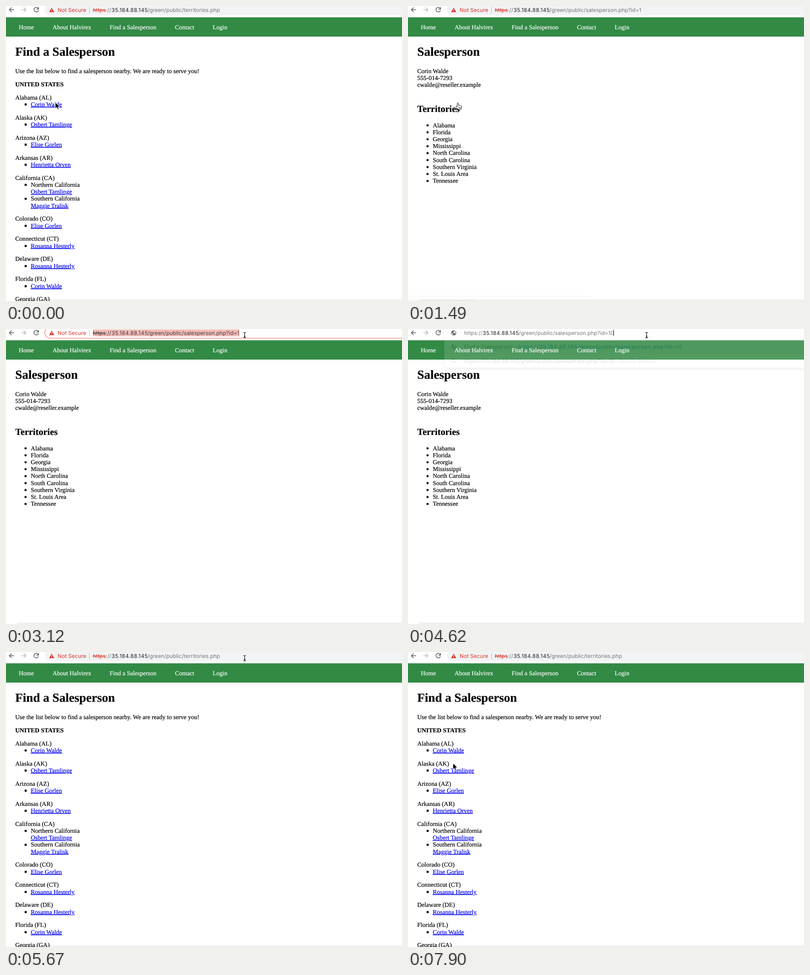
An HTML page that plays this animation: 867x646 px, repeating every 8000 ms.

```html
<!DOCTYPE html>
<html lang="en">
<head>
<meta charset="utf-8">
<title>Find a Salesperson</title>
<style>
html, body { margin: 0; width: 100%; height: 100%; overflow: hidden; background: #fff; }
svg { display: block; width: 867px; height: 646px; }
text {
  font: 13.55px "Liberation Serif", "Times New Roman", serif;
  text-rendering: geometricPrecision; white-space: pre;
  fill: currentColor; stroke: currentColor; stroke-width: .2px;
}
tspan { fill: currentColor; }
.h1 { font-size: 27.1px; font-weight: bold; }
.h2 { font-size: 20.32px; font-weight: bold; }
.b { font-weight: bold; }
.link { color: #00e; text-decoration: underline; }
.nav text { color: #fff; }
.ui text { font: 11.75px Inter, "Open Sans", sans-serif; letter-spacing: .05px; stroke: none; }
.ui .match { font-weight: 700; letter-spacing: .35px; color: #1a6fdf; }
.host { letter-spacing: .38px; }
.grey { color: #73777b; }
.ink { color: #202124; }
.red { color: #d5352b; }
.cut { text-decoration: line-through; }
.picked tspan { color: #4a3a3b; }
#bubble text { font-size: 10.2px; color: #555; }
</style>
</head>
<body>
<svg viewBox="0 0 867 646">
  <defs>
    <g id="globe">
      <circle r="5.6" fill="#5f6368"/>
      <path d="M-4.6-.8L-1 2.6V4.6Q-4.6 3.6-4.6-.8M.3-4.6V-2.6L-1.6-1.4V0H1.6L2.6 1.8H4Q5.6-2.6 2-4.2Z" fill="#fff" opacity=".85"/>
    </g>
    <path id="bar" d="M-3-6Q0-6 0-4V4Q0 6-3 6M3-6Q0-6 0-4M0 4Q0 6 3 6M-1.6 2.4H1.6"/>
  </defs>
  <rect x="24" y="642.5" width="843" height="4" fill="#f1f1f1"/>
  <g id="list"></g>
  <g id="person"></g>
  <g class="nav" id="nav"><rect y="24.5" width="867" height="42.5" fill="#328a45"/></g>
  <g class="ui">
    <g id="bubble">
      <rect x="-6" y="636" width="405" height="20" rx="3" fill="#f6f7f8" stroke="#c4c6c8" style="filter:drop-shadow(0 0 3px #0003)"/>
      <text id="status" x="-4" y="648.5"></text>
    </g>
    <rect width="867" height="24.5" fill="#fff"/>
    <rect y="23.7" width="867" height=".8" fill="#dadce0"/>
    <rect id="pill" x="85" y="-4" width="900" height="24.4" rx="12.2" fill="#f1f3f4"/>
    <rect id="ring" x="84.8" y="-4" width="900" height="24.2" rx="12.1" fill="#fff" stroke="#ef9a90" stroke-width="1.6"/>
    <g id="drop">
      <rect x="79.5" y="-20" width="820" height="104.5" rx="7" fill="#fff" style="filter:drop-shadow(0 4px 4px #0006)"/>
      <rect x="79.5" y="24" width="788" height="30.4" fill="#f1f1f2"/>
      <use href="#globe" x="100" y="39"/>
      <text x="123" y="43.3" class="ink">Find a Salesperson - </text>
      <text x="241" y="43.3" class="match">https://35.184.88.145/green/public/salesperson.php?id=10</text>
      <g fill="none" stroke="#6b6f73" stroke-width="1.4"><circle cx="98.8" cy="68.2" r="3.2"/><path d="M101.2 70.6L105 74.4"/></g>
      <text x="123" y="73.8" class="ink">https://<tspan class="host">35.184.88.145</tspan>/green/public/salesperson.php?id=10</text>
      <text x="453" y="73.8" class="grey">- Quorle Search</text>
    </g>
    <g fill="none" stroke-width="1.5">
      <path d="M17.5 8.3H7.5M12.3 3.3L7.3 8.3 12.3 13.3" stroke="#55595d"/>
      <path d="M33.5 8.3H43.5M38.7 3.3L43.7 8.3 38.7 13.3" stroke="#babcbf"/>
      <path id="reload" d="M70.4 5.3A5 5 0 1 0 71 9.6M71.2 2.4V6.8H66.8" stroke="#55595d"/>
      <path id="stop" d="M61.7 4L70.3 12.6M70.3 4L61.7 12.6" stroke="#55595d"/>
    </g>
    <g id="secure">
      <path d="M100 3.6L105.6 13.4H94.4Z" fill="#d5352b"/>
      <path d="M100 6.8V10M100 11V12.2" stroke="#fff" stroke-width="1.2"/>
      <text x="113" y="13" class="red">Not Secure</text>
      <path d="M182.5 2V16" stroke="#c9b5b4"/>
      <rect id="pick" x="190" y="1" width="321" height="15" fill="#f2bdb9"/>
      <text id="url" y="13"><tspan x="190" class="red cut">https</tspan><tspan class="grey">://</tspan><tspan x="231" class="ink host">35.184.88.145</tspan><tspan x="310" class="grey" id="path"></tspan></text>
    </g>
    <g id="edit">
      <use href="#globe" x="100" y="8.5"/>
      <text y="13"><tspan x="123" class="grey">https://</tspan><tspan x="163.5" class="ink host">35.184.88.145</tspan><tspan x="242.5" class="grey">/green/public/salesperson.php?id=10</tspan></text>
    </g>
    <rect id="caret" y="1.5" width="1" height="14" fill="#222"/>
  </g>
  <g id="cursor">
    <path id="arrow" d="M0 0V13.6L3.2 10.7 5.3 15.4 7.6 14.4 5.6 9.8H9.8Z" stroke="#fff"/>
    <path id="hand" d="M-1.2 1.2C-1.2-.4 1.2-.4 1.2 1.2V5.4L2 5.2C3.3 4.6 4 5.2 4.2 6 5.4 5.2 6.3 6 6.5 6.8 7.8 6.2 8.4 7 8.4 8.2V10.3C8.4 12 7.4 13 7.1 14.6H0C-.5 13-3.4 10.4-4.2 8.6-4.4 7.2-3 7-2.2 7.8L-1.2 8.8ZM2 9.5V12.5M4 9.5V12.5M6 9.5V12.5" fill="#fff" stroke="#000" stroke-width=".9"/>
    <g id="beam" fill="none">
      <use href="#bar" stroke="#fff" stroke-width="2.4"/>
      <use href="#bar" stroke="#000" stroke-width="1.1"/>
    </g>
  </g>
</svg>
<script>
const $ = id => document.getElementById(id);
const add = (id, markup) => $(id).insertAdjacentHTML('beforeend', markup);
const label = (x, y, s, cls = '') => `<text x="${x}" y="${y}" class="${cls}">${s}</text>`;
const LINE = 15.24;

[[28, 'Home'], [102, 'About Halvirex'], [227, 'Find a Salesperson'], [370, 'Contact'], [452.5, 'Login']]
  .forEach(([x, s]) => add('nav', label(x, 51, s)));

// Territory list: a bullet per line, "Region|Person" shares one bullet
const groups = [
  ['Alabama (AL)', 'Corin Walde'],
  ['Alaska (AK)', 'Osbert Tamlinge'],
  ['Arizona (AZ)', 'Elise Gorlen'],
  ['Arkansas (AR)', 'Henrietta Orven'],
  ['California (CA)', 'Northern California|Osbert Tamlinge', 'Southern California|Maggie Tralisk'],
  ['Colorado (CO)', 'Elise Gorlen'],
  ['Connecticut (CT)', 'Rosanna Hesterly'],
  ['Delaware (DE)', 'Rosanna Hesterly'],
  ['Florida (FL)', 'Corin Walde'],
  ['Georgia (GA)']
];
add('list', label(20.3, 109, 'Find a Salesperson', 'h1') +
  label(20.3, 147, 'Use the list below to find a salesperson nearby. We are ready to serve you!') +
  label(20.3, 175.6, 'UNITED STATES', 'b'));
let y = 204.5;
for (const [state, ...items] of groups) {
  add('list', label(20.3, y, state));
  for (const item of items) {
    const parts = item.split('|');
    add('list', `<rect x="40.8" y="${y + LINE - 6.4}" width="4.5" height="4.5"/>`);
    parts.forEach((s, i) => add('list', label(54.2, y += LINE, s, i == parts.length - 1 ? 'link' : '')));
  }
  y += LINE + 13.55;
}

add('person', label(20.3, 109, 'Salesperson', 'h1') + label(20.3, 231.5, 'Territories', 'h2'));
['Corin Walde', '555-014-7293', 'cwalde@reseller.example']
  .forEach((s, i) => add('person', label(20.3, 147 + i * LINE, s)));
['Alabama', 'Florida', 'Georgia', 'Mississippi', 'North Carolina', 'South Carolina',
  'Southern Virginia', 'St. Louis Area', 'Tennessee'].forEach((s, i) => {
  const base = 265.5 + i * LINE;
  add('person', `<circle cx="42.8" cy="${base - 4.2}" r="2.4"/>` + label(54.2, base, s));
});

// Value of the last [time, value] pair already reached
const at = (t, keys) => keys.reduce((v, [k, next]) => t >= k ? next : v, keys[0][1]);
const show = (id, on) => $(id).style.display = on ? '' : 'none';
const fade = (id, o) => { show(id, o > 0); $(id).style.opacity = o; };

const TICK = 148.5;
function glide(t, start, ticks, [x0, y0], [x1, y1]) {
  const p = Math.min(1, Math.max(0, Math.floor((t - start) / TICK + .01) / ticks));
  const e = p * p * (3 - 2 * p);
  return [x0 + (x1 - x0) * e, y0 + (y1 - y0) * e];
}
function pointer(t) {
  if (t < 290) return [108, 211];
  if (t < 2670) return glide(t, 1490, 7, [109, 212], [525, 14]);
  if (t < 7750) return glide(t, 6570 - TICK, 8, [522.5, 13.5], [156, 205]);
  return t < 7900 ? [118, 231] : [98.5, 243.5];
}

function draw(t) {
  const person = t >= 1040 && t < 5670;
  const editing = t >= 4620 && t < 5520;
  const loading = t >= 590 && t < 1190;
  show('person', person);
  show('list', !person);
  show('edit', editing);
  show('secure', !editing);
  show('pill', !editing);
  show('stop', loading);
  show('reload', !loading);
  fade('bubble', at(t, [[0, 0], [290, .5], [440, 1], [1190, .5], [1490, .13], [1640, 0]]));
  fade('ring', at(t, [[0, 0], [2970, .5], [3120, 1], [4620, 0]]));
  fade('drop', at(t, [[0, 0], [4620, .15], [4770, 1], [5370, .5], [5520, 0]]));
  $('status').textContent = t < 590
    ? 'https://35.184.88.145/green/public/salesperson.php?id=1' : 'Establishing secure connection...';
  $('path').textContent = '/green/public/' + (!person ? 'territories.php'
    : 'salesperson.php?id=1' + (t >= 5520 ? '0' : ''));

  const picked = t >= 2970 && t < 3870;
  show('pick', picked);
  $('url').classList.toggle('picked', picked);
  show('caret', t >= 3870 && t < 4320 || t >= 4620 && t < 5220);
  $('caret').setAttribute('x', t < 4620 ? 510 : 449.7);

  const [x, y] = pointer(t);
  const kind = t >= 290 && t < 1490 + TICK ? 'hand' : y < 20 ? 'beam' : 'arrow';
  for (const id of ['arrow', 'hand', 'beam']) show(id, id == kind);
  $('cursor').setAttribute('transform', `translate(${x} ${y})`);
}

const begin = performance.now();
(function loop() {
  draw((performance.now() - begin) % 8000);
  requestAnimationFrame(loop);
})();
</script>
</body>
</html>
```
